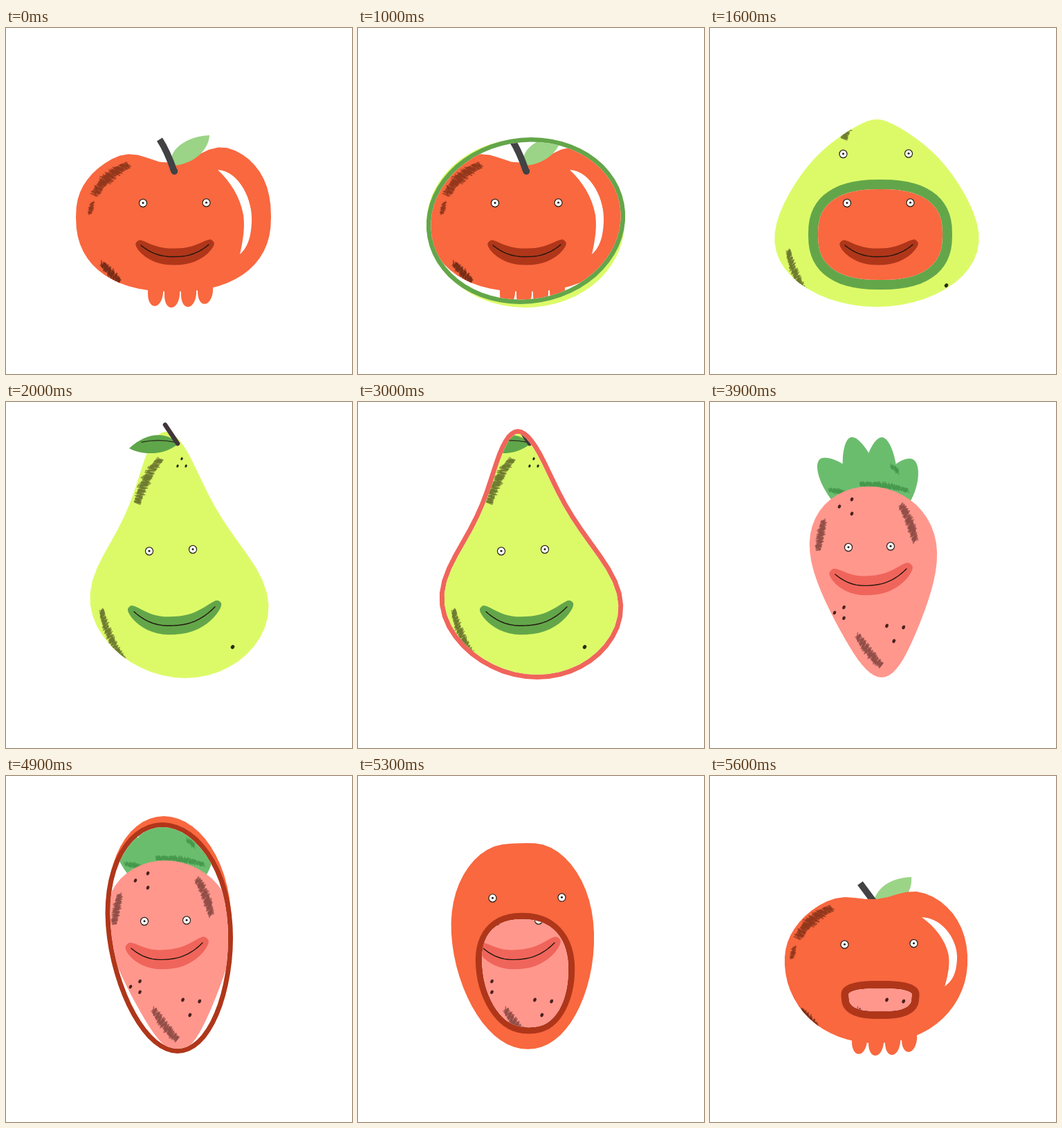
Recreate the animation shown at these times as an HTML page with a canvas. Size 500 px wide and 500 px high, loop 5.7 s.

```html
<!DOCTYPE html>
<html lang="en">
<head>
<meta charset="utf-8">
<title>Fruit swallowing fruit</title>
<style>
html, body { margin: 0; width: 100%; height: 100%; overflow: hidden; background: #fff; }
canvas { display: block; width: 100vw; height: 100vh; }
</style>
</head>
<body>
<canvas id="stage" width="500" height="500"></canvas>
<script>
const ctx = document.getElementById('stage').getContext('2d');
const LOOP = 5700, STEP = 100, N = 60;

const clamp = v => Math.max(0, Math.min(1, v));
const lerp = (a, b, k) => a + (b - a) * k;
const mix = (a, b, k) => a.map((p, i) => [lerp(p[0], b[i][0], k), lerp(p[1], b[i][1], k)]);
const bend = (v, p) => Math.sign(v) * Math.abs(v) ** p;

// Samples fn(sin, cos, angle) clockwise, starting at the top
function around(fn) {
  return Array.from({ length: N }, (_, i) => {
    const t = (i > N / 2 ? i - N : i) * 2 * Math.PI / N;
    return fn(Math.sin(t), Math.cos(t), t);
  });
}

// Rounded outline: taper widens the top, p squares it, peak narrows the tip, dip adds an apple notch
function egg({ x, y, rx, ry, taper = 0, sharp = 1, lean = 0, p = 1, peak = 0, dip = 0 }) {
  return around((s, c, t) => {
    const wide = 1 + taper * Math.tanh(sharp * c) - peak * Math.max(0, c) ** 4;
    const lobes = dip ? dip * Math.exp(-((t / .3) ** 2)) - 13 * s * Math.max(0, c) : 0;
    return [x + rx * bend(s, p) * wide + lean * c, y - ry * bend(c, p) + lobes];
  });
}

function inset(pts, w) {
  return pts.map(([x, y], i) => {
    const a = pts[(i + N - 1) % N], b = pts[(i + 1) % N];
    const dx = b[0] - a[0], dy = b[1] - a[1], l = Math.hypot(dx, dy) || 1;
    return [x - dy / l * w, y + dx / l * w];
  });
}

function smileAt({ x1, y1, x2, y2, sag }, u) {
  return [lerp(x1, x2, u), lerp(y1, y2, u) + sag * (1 - Math.abs(2 * u - 1) ** 2.4)];
}

// Shut mouth: the opening folds flat on the smile, the lips are a band around it
const shutLine = m => around(s => smileAt(m, .5 + .5 * s));
const shutLips = m => around((s, c) => {
  const u = .5 + .56 * bend(s, .9), [x, y] = smileAt(m, u), [x2, y2] = smileAt(m, u + .02);
  const l = Math.hypot(x2 - x, y2 - y), r = m.thick * bend(c, .65);
  return [x + (y2 - y) / l * r, y - (x2 - x) / l * r];
});

function trace(pts) {
  const path = new Path2D();
  pts.forEach(([x, y]) => path.lineTo(x, y));
  path.closePath();
  return path;
}

function shift(dx, dy, fn) {
  ctx.save();
  ctx.translate(dx, dy);
  fn();
  ctx.restore();
}

function fill(d, color) {
  ctx.fillStyle = color;
  ctx.fill(typeof d === 'string' ? new Path2D(d) : d);
}

function stroke(d, w, color, cap = 'round') {
  ctx.strokeStyle = color;
  ctx.lineWidth = w;
  ctx.lineCap = cap;
  ctx.lineJoin = 'round';
  ctx.stroke(typeof d === 'string' ? new Path2D(d) : d);
}

function dot(x, y, rx, ry, color, turn = 0) {
  ctx.fillStyle = color;
  ctx.beginPath();
  ctx.ellipse(x, y, rx, ry, turn, 0, 7);
  ctx.fill();
}

// Three seeds around a centre
function trio(x, y, r, turn, size, color) {
  for (let i = 0; i < 3; i++) {
    const a = (turn + 120 * i) * Math.PI / 180;
    dot(x + r * Math.cos(a), y + r * Math.sin(a), size, size * 1.35, color, .4);
  }
}

// Soft pencil shading along an arc
function scribble(x1, y1, x2, y2, w, color, arc = 0) {
  let seed = x1 * 31 + y1 * 17;
  const rnd = () => (seed = (seed * 16807 + 11) % 2147483647) / 2147483647;
  const dx = x2 - x1, dy = y2 - y1, l = Math.hypot(dx, dy), n = Math.round(l);
  const axis = new Path2D(), hatch = new Path2D();
  for (let i = 0; i <= n; i++) {
    const u = i / n, hump = 4 * u * (1 - u);
    const x = x1 + dx * u - dy / l * arc * hump, y = y1 + dy * u + dx / l * arc * hump;
    const r = (i % 2 ? w : -w) * (.28 + .2 * hump) * (.7 + .5 * rnd());
    const slip = r * .4 + (rnd() - .5) * 4;
    axis.lineTo(x, y);
    hatch.lineTo(x + (dx * slip - dy * r) / l, y + (dy * slip + dx * r) / l);
  }
  ctx.save();
  ctx.globalAlpha = .4;
  stroke(axis, w * .7, color, 'butt');
  ctx.globalAlpha = .55;
  stroke(hatch, 1.6, color);
  ctx.restore();
}

function eye(x, y) {
  dot(x, y, 6.1, 6.3, '#262019');
  dot(x, y, 4.9, 5.1, '#fff');
  dot(x, y - .3, 1.5, 1.5, '#1c1815');
}

function petal(bx, by, tx, ty, w, color) {
  const dx = tx - bx, dy = ty - by, l = Math.hypot(dx, dy) || 1;
  const at = (u, side) => `${bx + dx * u - dy / l * w * side} ${by + dy * u + dx / l * w * side} `;
  fill(`M${at(0, .5)}C${at(.55, .55)}${at(1, .25)}${at(1, 0)}C${at(1, -.25)}${at(.55, -.55)}${at(0, -.5)}Z`, color);
}

const pearShape = { x: 245, y: 221, rx: 104, ry: 178, taper: -.53, sharp: 2, lean: -14 };

// Outlines go from wide open to half open to shut.
// In the drawing hooks, b is how far the mouth has shut since half open.
const pear = {
  start: 1000, mid: 6, steps: 10, ease: 7,
  color: '#dcfa68', lipColor: '#63a64a', rim: [6.5, 14],
  body: [
    egg({ x: 242, y: 282, rx: 143, ry: 122 }),
    egg({ x: 241, y: 267.5, rx: 140, ry: 135.5, taper: -.25, sharp: 1.5, peak: .3 }),
    egg(pearShape)],
  rings: [
    egg({ x: 242.5, y: 278.5, rx: 143.5, ry: 120.5, lean: 8 }),
    egg({ x: 246, y: 298.5, rx: 104, ry: 79.5, p: .82 })],
  smile: { x1: 185, y1: 303, x2: 302, y2: 296, sag: 23.5, thick: 13 },
  eyes: [[192.5, 182, 287, 181.5], [207, 215.5, 270, 213]],
  marks(o) {
    const ink = '#464d1a';
    shift(4 * o, 14 * o, () => scribble(223, 82, 190, 146, 14, ink, 4));
    shift(-25 * o, 21 * o, () => scribble(138, 300, 173, 377, 11, ink, 5));
    shift(14 * o, 18 * o, () => dot(327.5, 354, 2.5, 3, '#262a10', .6));
    shift(0, 30 * o, () => trio(254, 89, 7, 30, 1.6, '#262a10'));
  },
  top(b) {
    const g = clamp(b * 2 - 1);
    if (!g) return;
    shift(248, 61 + (1 - b) * 90, () => {
      ctx.scale(g, g);
      fill('M0 0C-12 -17 -42 -20 -70 6C-46 18 -16 14 0 0Z', '#5fa64b');
      stroke('M-52 -3Q-28 -8 -4 -3', 1.4, '#2c3820');
      stroke('M0 -1L-18 -28', 6.5, '#40363a');
    });
  }
};

const berry = {
  start: 3000, mid: 5, steps: 9, ease: 1,
  color: '#ff978d', lipColor: '#f0655b', rim: [7, 15],
  body: [
    egg(pearShape),
    egg({ x: 237, y: 239, rx: 112, ry: 164, lean: -10, p: .93 }),
    egg({ x: 239, y: 260, rx: 84, ry: 138, taper: .5, lean: -9 })],
  rings: [
    egg({ ...pearShape, y: 220, rx: 107, ry: 181 }),
    egg({ x: 239.5, y: 255, rx: 97.5, ry: 87, p: .85 })],
  smile: { x1: 181, y1: 249, x2: 284, y2: 241, sag: 20, thick: 14 },
  eyes: [[179, 160, 278, 155.5], [200, 210, 261, 208.5]],
  back(b) {
    const green = '#6bbd6e', ink = '#378a40';
    for (let t = -1.5; t < 2; t++) {
      petal(lerp(232 + 29 * t, 235 + 18 * t, b), lerp(94, 139, b),
        lerp(231 + 37 * t, 226 + 45 * t, b), lerp(50 + 7.5 * t * t, 47 + 16 * t * t, b), lerp(22, 52, b), green);
    }
    dot(230, 122, 63 * b, 20 * b, green);
    if (b < 1) return;
    scribble(172, 127, 196, 131, 8, ink);
    scribble(216, 119, 286, 128, 9, ink, -3);
    scribble(262, 92, 272, 101, 7, ink);
  },
  marks(o) {
    const ink = '#6b342e', seed = '#4b201b';
    shift(28 * o, -22 * o, () => scribble(276, 148, 297, 201, 13, ink, -2));
    shift(-27 * o, -15 * o, () => scribble(164, 171, 156, 214, 11, ink));
    shift(-28 * o, 26 * o, () => scribble(213, 337, 248, 381, 13, ink, 2));
    shift(-8 * o, -39 * o, () => trio(199, 151, 12, 60, 2.1, seed));
    shift(-35 * o, 24 * o, () => trio(189, 304.5, 9, 60, 2.1, seed));
    shift(41.5 * o, 26 * o, () => trio(267, 331.5, 14, 95, 2.2, seed));
  }
};

const apple = {
  start: 4900, mid: 7, steps: 8, ease: 2,
  color: '#f9683f', lipColor: '#b0361a', rim: [7, 11],
  body: [
    egg({ x: 238, y: 228.5, rx: 88, ry: 170.5, taper: .17, lean: -10 }),
    egg({ x: 240, y: 273, rx: 132, ry: 113, taper: .05, p: .95, dip: 18 }),
    egg({ x: 242, y: 273, rx: 141, ry: 108, p: .86, dip: 30 })],
  rings: [
    egg({ x: 237, y: 234, rx: 91, ry: 167, taper: .12, lean: -11 }),
    egg({ x: 246, y: 323.5, rx: 56, ry: 27.5, taper: .12, p: .72 })],
  smile: { x1: 195, y1: 314, x2: 293, y2: 313, sag: 17, thick: 12 },
  eyes: [[194.5, 243.5, 294.5, 242], [198, 253, 289.5, 252.5]],
  back(b) {
    for (let i = 0; i < 4; i++) {
      const x = 205 + 24 * i, y = 404 - 1.6 * (i - 1.2) ** 2;
      fill(`M${x} ${y - 34}v16C${x} ${y + 6} ${x + 19} ${y + 6} ${x + 22} ${y - 18}v-16Z`, this.color);
    }
    if (b < 1) {
      fill('M236 182C243 157 266 147 291 146C292 158 289 176 262 190Z', '#9bd487');
      stroke('M217 155L240 186', 9.5, '#424244', 'butt');
    }
  },
  marks(o) {
    const ink = '#6e2610';
    shift(-o, -7 * o, () => scribble(177, 198, 128, 241, 16, ink, 6));
    shift(-3 * o, -5 * o, () => scribble(125, 252, 121, 269, 7, ink));
    shift(-9 * o, -3 * o, () => scribble(138, 340, 164, 367, 12, '#4a1609'));
    shift(306, 205 - o, () => {
      ctx.scale(1 + .04 * o, 1 - .18 * o);
      fill('M0 0C32 2 51 45 49 75C48 100 42 113 32 122C38 96 39 80 37 65C32 38 18 17 0 0Z', '#fff');
    });
  },
  top(b) {
    if (b < 1) return;
    fill('M240 199C232 176 262 156 294 155C293 176 272 197 240 199Z', '#9bd487');
    stroke('M222 161Q233 178 243 207', 9.5, '#424244', 'butt');
    dot(243.3, 207, 4.9, 5, '#424244');
  }
};

const fruits = [pear, berry, apple];
for (const f of fruits) {
  f.lips = [...f.rings, shutLips(f.smile)];
  f.holes = [inset(f.rings[0], f.rim[0]), inset(f.rings[1], f.rim[1]), shutLine(f.smile)];
  // Eyes start out hidden behind the rim
  const [x1, , x2] = f.eyes[0], y = f.rings[0][0][1] + 20;
  f.eyes.unshift([x1, y, x2, y]);
}

function drawFruit(f, s, inside) {
  const closing = s >= f.mid, i = closing ? 1 : 0;
  const k = closing ? (s - f.mid) / (f.steps - f.mid) : s / f.mid;
  const b = closing ? k : 0, grown = closing || k > .8;
  const at = keys => mix(keys[i], keys[i + 1], k);
  const body = trace(mix(f.body[i], f.body[i + 1], closing ? k : k ** f.ease));

  if (grown && f.back) f.back(b);
  fill(body, f.color);
  ctx.save();
  ctx.clip(body);
  if (grown) f.marks(1 - b);
  const [x1, y1, x2, y2] = f.eyes[i].map((v, j) => lerp(v, f.eyes[i + 1][j], k));
  eye(x1, y1);
  eye(x2, y2);
  ctx.restore();
  if (f.top) f.top(b);
  fill(trace(at(f.lips)), f.lipColor);

  if (b === 1) {
    stroke(trace(shutLine(f.smile)), 1.4, '#22170f');
    return;
  }
  const mouth = trace(at(f.holes));
  fill(mouth, '#fff');
  ctx.save();
  ctx.clip(mouth);
  drawFruit(inside, inside.steps);
  ctx.restore();
}

// The apple sits still until the pear arrives, then each fruit swallows the last
function draw(time) {
  const t = time % LOOP;
  const n = (fruits.filter(f => t >= f.start).length + 2) % 3, f = fruits[n];
  const s = t < f.start ? f.steps : Math.min(f.steps, Math.floor((t - f.start) / STEP));
  ctx.fillStyle = '#fff';
  ctx.fillRect(0, 0, 500, 500);
  drawFruit(f, s, fruits[(n + 2) % 3]);
}

const begin = performance.now();
function tick() {
  draw(performance.now() - begin);
  requestAnimationFrame(tick);
}
tick();
</script>
</body>
</html>
```
